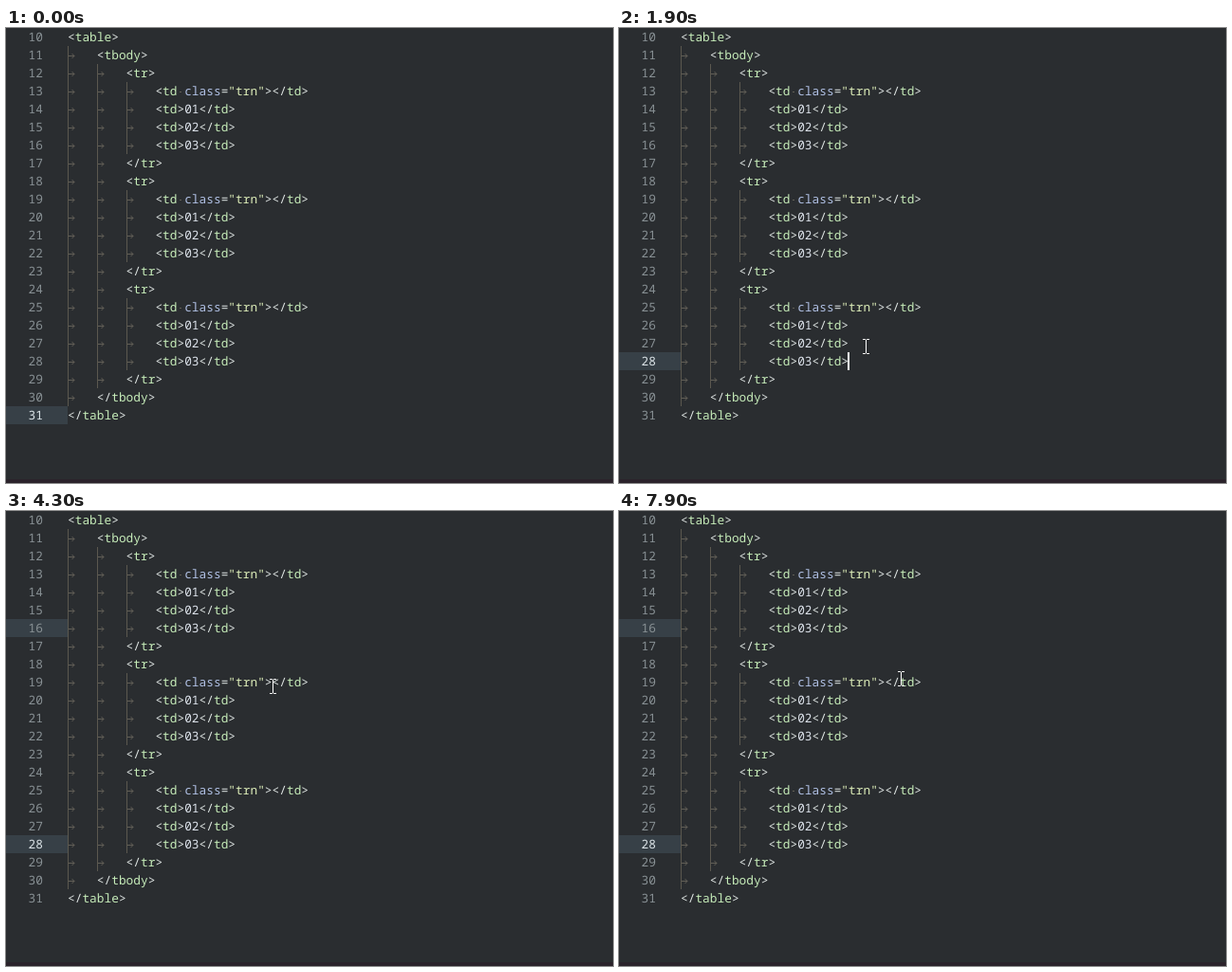
Write an HTML page with a canvas that moves like this. It is 640 by 480 pixels and loops after 8000 ms.

```html
<!DOCTYPE html>
<html lang="en">
<head>
<meta charset="utf-8">
<title>Code editor</title>
<style>
  html, body { margin: 0; width: 100%; height: 100%; overflow: hidden; background: #2a2d30; }
  canvas { display: block; }
</style>
</head>
<body>
<canvas id="stage" width="640" height="480"></canvas>
<script>
const ctx = document.getElementById('stage').getContext('2d', { alpha: false });

const LOOP = 8000, STEP = 100, BLINK = 445;
const ROW = 19, FIRST = 10, LEFT = 65, CHAR = 7.698, TAB = CHAR * 4;
const FONT = '12.83px "Noto Sans Mono", monospace';
const COLOR = {
  bg: '#2a2d30', bar: '#2b232b', active: '#374047',
  number: '#889094', current: '#dbe3e7',
  mark: '#e0e6e4', tag: '#c6ecb9', attr: '#b0c0e4', string: '#dcecb8', text: '#dce2ea',
  guide: '#5b584f', arrow: '#625f57', pointer: '#ffffff'
};

const cells = ['<td class="trn"></td>', ...[1, 2, 3].map(i => `<td>0${i}</td>`)];
const group = [[2, '<tr>'], ...cells.map(c => [3, c]), [2, '</tr>']];
const lines = [
  [0, '<table>'], [1, '<tbody>'],
  ...group, ...group, ...group,
  [1, '</tbody>'], [0, '</table>']
];

// The pointer eases to each place in turn and rests between moves
const entry = { start: 400, x: 37, y: 15 };
const moves = [
  { start: 400, end: 900, x: 268, y: 388 },
  { start: 900, end: 1100, x: 257, y: 353 },
  { start: 1800, end: 2400, x: 303, y: 128 },
  { start: 2400, end: 2700, x: 266, y: 120 },
  { start: 2800, end: 3100, x: 252, y: 130 },
  { start: 3900, end: 4300, x: 281, y: 185 },
  { start: 5400, end: 5600, x: 297, y: 177 }
];

// Focus, click, then a second click that adds a caret; blinking restarts each time
const clicks = [
  { time: 0, blinkFrom: Infinity, rows: [31] },
  { time: 1400, blinkFrom: 1400, rows: [31] },
  { time: 1600, blinkFrom: 1600, rows: [28] },
  { time: 3700, blinkFrom: 3820, rows: [28, 16] }
];

const rowTop = n => (n - FIRST) * ROW;
const ease = k => k * k * (3 - 2 * k);

function rect(x, y, w, h, color) {
  ctx.fillStyle = color;
  ctx.fillRect(x, y, w, h);
}

function text(str, x, y, color) {
  ctx.fillStyle = color;
  ctx.fillText(str, x, y);
}

function pointerAt(t) {
  let { x, y } = entry;
  for (const m of moves) {
    if (t < m.start) break;
    const k = ease(Math.min(1, (t - m.start) / (m.end - m.start)));
    x += (m.x - x) * k;
    y += (m.y - y) * k;
  }
  return [Math.round(x), Math.round(y)];
}

function caretShown(t, { time, blinkFrom }) {
  if (blinkFrom === Infinity) return false;
  return Math.floor(Math.max(0, t - blinkFrom) / BLINK) % 2 === 0;
}

function drawTabs(depth, top) {
  for (let i = 0; i < depth; i++) {
    const x = Math.round(LEFT + i * TAB);
    rect(x, top, 1, ROW, COLOR.guide);
    rect(x + 1, top + 10, 6, 1, COLOR.arrow);
    ctx.strokeStyle = COLOR.arrow;
    ctx.beginPath();
    ctx.moveTo(x + 4.5, top + 8);
    ctx.lineTo(x + 7, top + 10.5);
    ctx.lineTo(x + 4.5, top + 13);
    ctx.stroke();
  }
}

function drawCode(depth, code, top) {
  let x = LEFT + depth * TAB, prev = '';
  for (const token of code.match(/<\/?|[>=]|"\w+"|\w+|\s/g)) {
    let color = COLOR.text;
    if (/[<>=]/.test(token)) color = COLOR.mark;
    else if (token[0] === '"') color = COLOR.string;
    else if (prev[0] === '<') color = COLOR.tag;
    else if (prev === ' ') color = COLOR.attr;

    if (token === ' ') rect(Math.round(x + 3), top + 10, 2, 1, COLOR.arrow);
    else text(token, x, top + 14, color);
    x += token.length * CHAR;
    prev = token;
  }
}

function drawCaret(n) {
  const [depth, code] = lines[n - FIRST];
  const x = LEFT + depth * TAB + code.length * CHAR;
  rect(Math.floor(x - 0.5), rowTop(n), 2, ROW, COLOR.pointer);
}

function drawPointer([x, y]) {
  rect(x, y - 7, 1, 14, COLOR.pointer);
  for (const end of [y - 8, y + 7]) {
    rect(x - 3, end, 3, 1, COLOR.pointer);
    rect(x + 1, end, 3, 1, COLOR.pointer);
  }
}

function draw(t) {
  const click = clicks.filter(c => c.time <= t).pop();
  rect(0, 0, 640, 480, COLOR.bg);
  rect(0, 476, 640, 4, COLOR.bar);
  for (const n of click.rows) rect(0, rowTop(n), 65, ROW, COLOR.active);

  ctx.font = FONT;
  ctx.textRendering = 'geometricPrecision';
  lines.forEach(([depth, code], i) => {
    const n = i + FIRST, top = rowTop(n);
    text(String(n), 23.6, top + 14, n === click.rows[0] ? COLOR.current : COLOR.number);
    drawTabs(depth, top);
    drawCode(depth, code, top);
  });

  if (caretShown(t, click)) click.rows.forEach(drawCaret);
  if (t >= entry.start) drawPointer(pointerAt(t));
}

const start = performance.now();
function frame() {
  const t = (performance.now() - start) % LOOP;
  draw(Math.floor(t / STEP) * STEP);
  requestAnimationFrame(frame);
}
frame();
</script>
</body>
</html>
```
